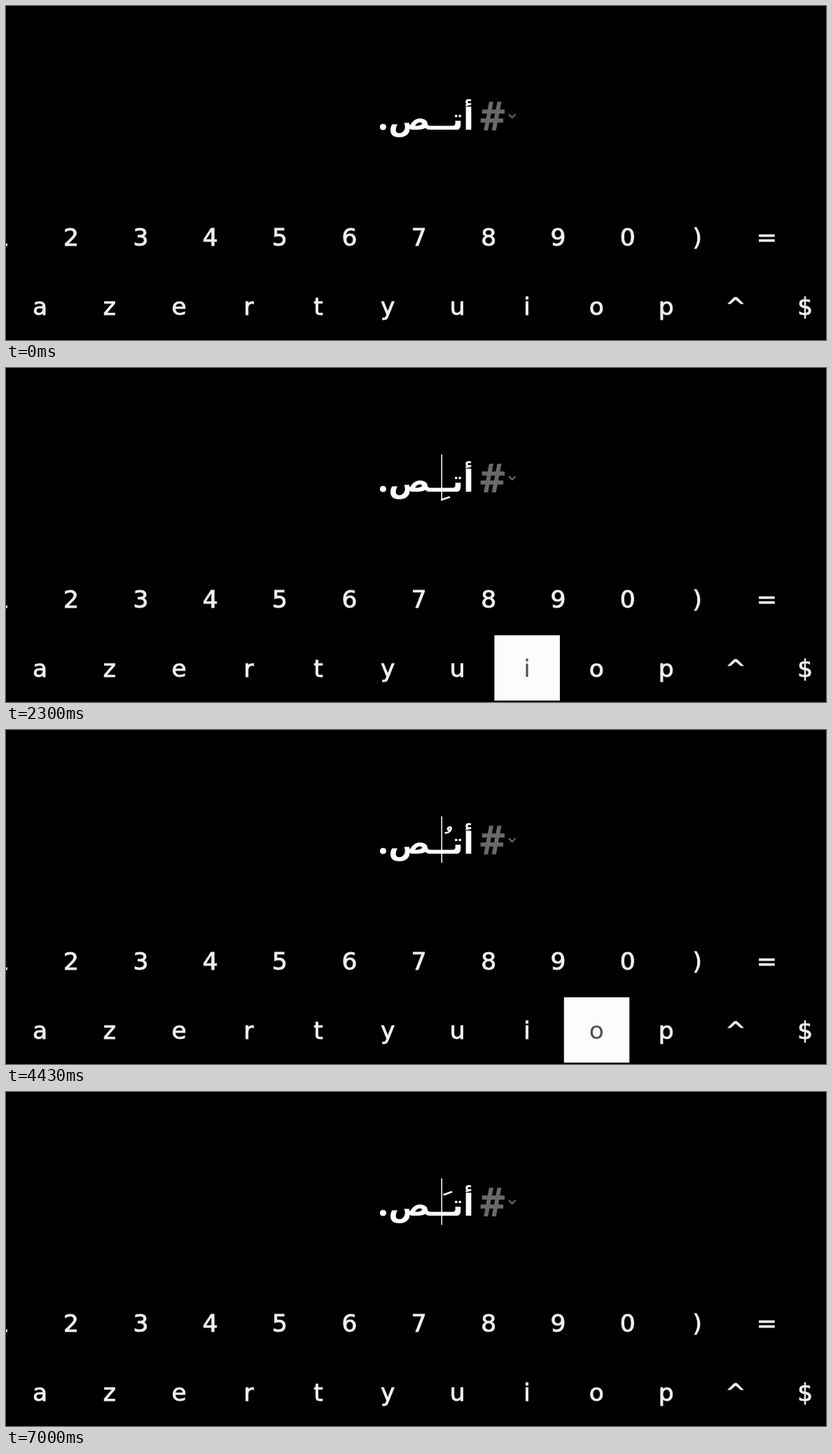
Recreate the animation shown at these times as an HTML page. Size 1171 by 478 pixels, loop 7.03 s.

```html
<!DOCTYPE html>
<html lang="en">
<head>
<meta charset="utf-8">
<title>Vowel marks</title>
<style>
  html, body { margin: 0; width: 100%; height: 100%; overflow: hidden; background: #000; }
  svg { display: block; width: 100%; height: 100%; }
  .key text { font: 34.5px "DejaVu Sans", sans-serif; fill: #f0f0f0; stroke: #f0f0f0; stroke-width: .9; text-anchor: middle; }
  .key rect { fill: none; }
  .key.down rect { fill: #fcfcfc; }
  .key.down text { fill: #505050; stroke: none; }
  .word { font: bold 44px "DejaVu Sans", sans-serif; fill: #fff; direction: rtl; }
  .stop { font: bold 54px "Noto Serif", serif; }
  .hash { font: bold 57px "Open Sans", sans-serif; fill: #69696c; }
  .chevron { fill: none; stroke: #69696c; stroke-width: 2; }
  .mark { fill: none; stroke: #fff; stroke-width: 2.6; visibility: hidden; }
  .caret { fill: #fff; visibility: hidden; }
  .on { visibility: visible; }
</style>
</head>
<body>
<svg viewBox="0 0 1171 478">
  <text class="word" x="668" y="177">أتــص<tspan class="stop">.</tspan></text>
  <text class="hash" x="676.5" y="177.5">#</text>
  <path class="chevron" d="M718 155l4.8 4.8 4.8-4.8"/>
  <path class="mark" id="fatha" d="M624.5 147.2L637 142.8"/>
  <path class="mark" id="kasra" d="M621.5 188.8L634 184.4"/>
  <path class="mark" id="damma" d="M635.5 142c-2.5 2.2-6 .8-4.2-1.6s5-1.6 4.2 1.6c-1 3.4-4.5 5.2-9 5.5"/>
  <rect class="caret" id="caret" x="621.5" y="123.5" width="1.5" height="66.5"/>
  <g id="keys"></g>
</svg>
<script>
  const LOOP = 7030, HOLD = 240, BLINK = 530, STEP = 99.35;
  const strokes = [
    { at: 300, key: "a", mark: "fatha" },
    { at: 2150, key: "i", mark: "kasra" },
    { at: 3250, key: "a", mark: "fatha" },
    { at: 4300, key: "o", mark: "damma" },
    { at: 5050, key: "i", mark: "kasra" },
    { at: 6640, key: "a", mark: "fatha" }
  ];
  const byId = id => document.getElementById(id);
  const keys = {};

  function addSvg(parent, tag, attrs) {
    const node = document.createElementNS("http://www.w3.org/2000/svg", tag);
    for (const name in attrs) node.setAttribute(name, attrs[name]);
    return parent.appendChild(node);
  }

  function addRow(labels, x, baseline) {
    [...labels].forEach((label, i) => {
      const cx = x + i * STEP;
      const key = keys[label] = addSvg(byId("keys"), "g", { class: "key" });
      addSvg(key, "rect", { x: cx - 46.5, y: baseline - 59, width: 93.5, height: 93.5 });
      addSvg(key, "text", { x: cx, y: baseline }).textContent = label;
    });
  }
  addRow("1234567890)=", -6.3, 343);
  addRow("azertyuiop^$", 48.5, 441.5);

  function draw() {
    const t = performance.now() % LOOP;
    const last = strokes.filter(s => s.at <= t).pop();
    const age = last ? t - last.at : 0;
    for (const name of ["a", "i", "o"])
      keys[name].classList.toggle("down", !!last && last.key === name && age < HOLD);
    for (const name of ["fatha", "kasra", "damma"])
      byId(name).classList.toggle("on", !!last && last.mark === name);
    byId("caret").classList.toggle("on", !!last && Math.floor(age / BLINK) % 2 === 0);
    requestAnimationFrame(draw);
  }
  draw();
</script>
</body>
</html>
```
